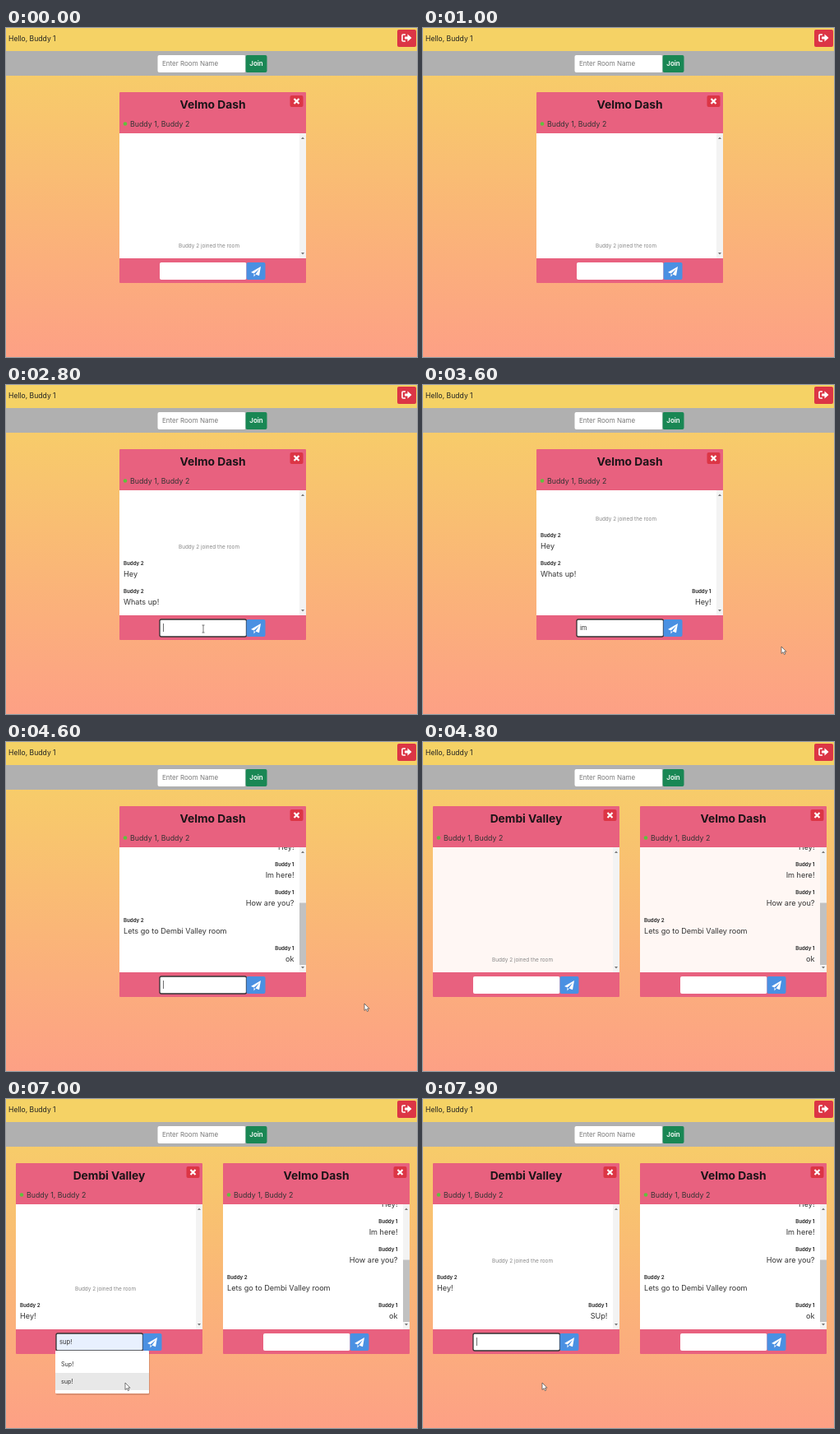
Write an HTML page that moves like this. It is 500x400 px and loops after 8000 ms.

```html
<!DOCTYPE html>
<html lang="en">
<head>
<meta charset="utf-8">
<title>Chat rooms</title>
<style>
  html, body { margin: 0; width: 100%; height: 100%; overflow: hidden; }
  svg { display: block; }
  #stage { width: 100vw; height: 100vh; }
  text { font-family: Inter, "Open Sans", sans-serif; fill: #333; }
</style>
</head>
<body>
<svg id="stage" viewBox="0 0 500 400">
  <defs>
    <linearGradient id="sky" x1="0" y1="0" x2="0" y2="1">
      <stop offset="0" stop-color="#f6d365"/>
      <stop offset="1" stop-color="#fda085"/>
    </linearGradient>
  </defs>
  <rect width="500" height="400" fill="url(#sky)"/>
  <rect width="500" height="28" fill="#f5d265"/>
  <rect y="28" width="500" height="30" fill="#b0b0b0"/>
  <g id="scene"></g>
</svg>
<script>
const LOOP = 8000, STEP = 100, SPLIT = 4700;
const ME = "Buddy 1", FRIEND = "Buddy 2";
const scene = document.getElementById("scene");

const firstRoom = {
  title: "Velmo Dash",
  messages: [
    [1200, FRIEND, "Hey"],
    [2000, FRIEND, "Whats up!"],
    [3400, ME, "Hey!"],
    [3900, ME, "Im here!"],
    [4100, ME, "How are you?"],
    [4300, FRIEND, "Lets go to Dembi Valley room"],
    [4500, ME, "ok"]
  ],
  // [time, input text]; null means the field has no focus
  typing: [[0, null], [2700, ""], [3000, "H"], [3100, "He"], [3200, "Hey"], [3300, "Hey!"],
    [3400, ""], [3600, "im"], [3700, "im he"], [3800, "im here!"], [3900, ""],
    [4000, "How are you?"], [4100, ""], [4400, "ok"], [4500, ""], [SPLIT, null]]
};

const secondRoom = {
  title: "Dembi Valley",
  messages: [[5700, FRIEND, "Hey!"], [7500, ME, "SUp!"]],
  typing: [[0, null], [6300, ""], [6500, "S"], [6600, "SU"], [6800, "sup!"], [7400, "SUp!"], [7500, ""]]
};

// [time, x, y]
const trips = [
  [[2000, 470, 240], [2300, 443, 274], [2700, 240, 292], [2900, 240, 292], [3300, 436, 318], [4600, 436, 318]],
  [[5500, 200, 340], [5900, 120, 291], [6500, 120, 291], [6800, 145, 345], [8000, 145, 345]]
];

const rect = (x, y, w, h, fill, extra = "") =>
  `<rect x="${x}" y="${y}" width="${w}" height="${h}" fill="${fill}" ${extra}/>`;

const path = (d, extra) => `<path d="${d}" ${extra}/>`;

const label = (x, y, size, text, extra = "") =>
  `<text x="${x}" y="${y}" font-size="${size}" ${extra}>${text}</text>`;

const latest = (list, t) => list.filter(([start]) => start <= t).pop()[1];

function topBar() {
  return label(3, 16, 8.6, `Hello, ${ME} !`.replace(" !", ""), 'style="fill:#222"') +
    rect(476, 2, 23, 21, "#dc3545", 'rx="2"') +
    path("M486 8h-3q-1 0-1 1v6q0 1 1 1h3", 'fill="none" stroke="#fff" stroke-width="1.6"') +
    path("M485 10.5h3.5V7.5l5 4.5-5 4.5v-3H485z", 'fill="#fff"') +
    rect(184.5, 33, 107, 21, "#fff", 'rx="2"') +
    label(190, 46, 8, "Enter Room Name", 'style="fill:#777"') +
    rect(291.5, 33, 26, 21, "#198754", 'rx="2"') +
    label(304.5, 46, 8, "Join", 'text-anchor="middle" font-weight="600" style="fill:#fff"');
}

function messageList(messages) {
  const count = messages.length;
  let out = label(109, 139.3 - 34 * count, 6.4, `${FRIEND} joined the room`,
    'text-anchor="middle" style="fill:#888"');
  messages.forEach(([, who, text], i) => {
    const lift = 34 * (count - 1 - i);
    const mine = who === ME;
    const x = mine ? 212.5 : 5;
    const anchor = mine ? 'text-anchor="end"' : "";
    out += label(x, 124.7 - lift, 6.1, who, anchor + ' font-weight="700"') +
      label(x, 139 - lift, 9.1, text, anchor);
  });
  return out;
}

function scrollBar(count) {
  const content = 40 + 34 * count;
  const thumb = 138 * 152 / content;
  return rect(219, 0, 8, 152, "#f3f3f3") +
    path("M221 7l2-2.5 2 2.5zM221 145l2 2.5 2-2.5z", 'fill="#777"') +
    (content > 152 ? rect(219, 143 - thumb, 8, thumb, "#c1c1c1") : "");
}

function inputRow(value, suggested) {
  const focused = value !== null;
  return rect(49, 207, 105.5, 21, suggested ? "#e8f0fe" : "#fff",
      'rx="2"' + (focused ? ' stroke="#333" stroke-width="1.3"' : "")) +
    label(53, 220, 7.6, value || "") +
    (value === "" ? rect(53, 212, 0.7, 10, "#333") : "") +
    rect(154.5, 207, 23, 21, "#4a90e2", 'rx="2"') +
    path("M172 212l-12 7 3.6 1.5L170 215l-4.5 6.5 4.5 1.8zM163.5 221v3.5l2-2.5z", 'fill="#fff"');
}

function panel(room, x, t) {
  const messages = room.messages.filter(([start]) => start <= t);
  const fresh = Math.max(0, 1 - Math.abs(t - SPLIT) / 800) * (t >= SPLIT);
  const value = latest(room.typing, t);
  const suggesting = room === secondRoom && t >= 6800 && t < 7400;
  return `<g transform="translate(${x} 78)">` +
    rect(0, 0, 227, 232, "#e8617f", 'rx="1"') +
    label(113.5, 20, 13.8, room.title, 'text-anchor="middle" font-weight="700" style="fill:#1c1418"') +
    rect(207.5, 4, 16, 14, "#dc3545", 'rx="2"') +
    path("M212.5 8l6 6m0-6l-6 6", 'stroke="#fff" stroke-width="2.2"') +
    '<circle cx="7" cy="38.5" r="2.3" fill="#5fc13c"/>' +
    label(13, 41.5, 8.8, `${ME}, ${FRIEND}`) +
    `<svg y="50" width="227" height="152">` + rect(0, 0, 227, 152, "#fff") +
    rect(0, 0, 227, 152, "#fda085", `opacity="${fresh * 0.1}"`) +
    messageList(messages) + scrollBar(messages.length) + "</svg>" +
    inputRow(value, suggesting) + "</g>";
}

function suggestions() {
  return rect(60.5, 307, 114.5, 53, "#0002", 'rx="2"') +
    rect(60, 306, 114, 52, "#fff", 'rx="1"') +
    rect(60, 333, 114, 21, "#e8e8e8") +
    label(67, 324.5, 7.2, "Sup!") + label(67, 346, 7.2, "sup!");
}

function cursor(t) {
  const trip = trips.find(p => t >= p[0][0] && t <= p[p.length - 1][0]);
  if (!trip) return "";
  const i = Math.max(1, trip.findIndex(([time]) => time >= t));
  const [t0, x0, y0] = trip[i - 1], [t1, x1, y1] = trip[i];
  const k = (t - t0) / (t1 - t0), ease = k * k * (3 - 2 * k);
  const x = x0 + (x1 - x0) * ease, y = y0 + (y1 - y0) * ease;
  const left = t < SPLIT ? 187 : 61;
  const overField = x > left && x < left + 105 && y > 285 && y < 306;
  const shape = overField
    ? path("M-1.5 0h3M0 0v9M-1.5 9h3", 'stroke="#555" stroke-width=".8"')
    : path("M0 0v8.5l2-1.8 1.4 3 1.4-.7-1.4-2.8h2.6z", 'fill="#fff" stroke="#444" stroke-width=".7"');
  return `<g transform="translate(${x} ${y})">${shape}</g>`;
}

function draw(t) {
  const rooms = t < SPLIT
    ? panel(firstRoom, 138, t)
    : panel(secondRoom, 12, t) + panel(firstRoom, 264, t);
  const menu = t >= 6600 && t < 7400 ? suggestions() : "";
  scene.innerHTML = topBar() + rooms + menu + cursor(t);
}

const start = performance.now();
let shown = -1;
function tick() {
  const t = Math.floor((performance.now() - start) % LOOP / STEP) * STEP;
  if (t !== shown) draw(shown = t);
  requestAnimationFrame(tick);
}
tick();
</script>
</body>
</html>
```
